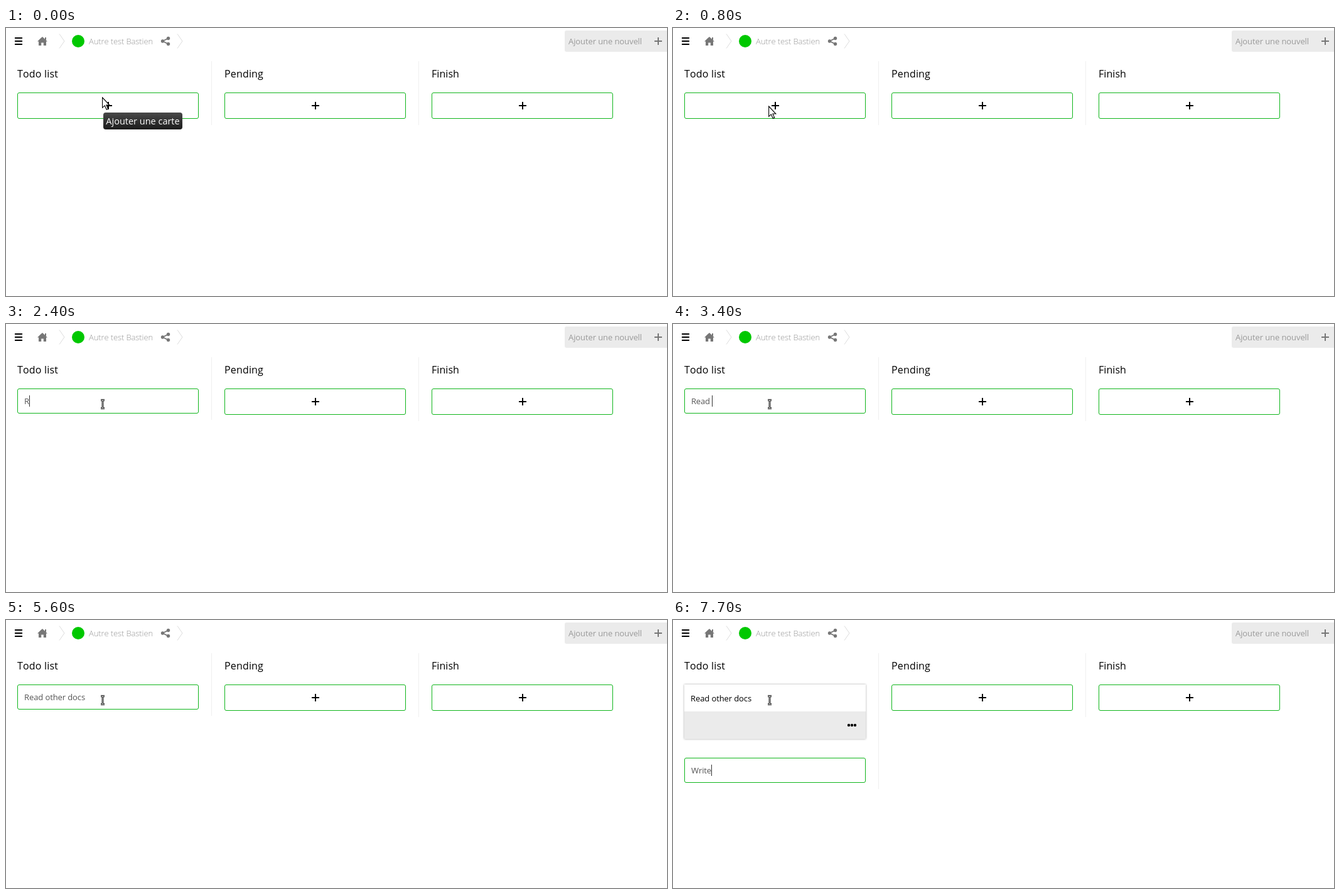
Recreate the animation shown at these times as an HTML page. Size 1053 px wide and 428 px high, loop 8 s.

```html
<!DOCTYPE html>
<html lang="fr">
<head>
<meta charset="utf-8">
<title>Tableau de cartes</title>
<style>
html, body { margin: 0; width: 100%; height: 100%; overflow: hidden; background: #fff; }
#stage { position: relative; width: 1053px; height: 428px; overflow: hidden;
  font: 13px/18px "Open Sans", "Noto Sans", sans-serif; font-kerning: none; color: #000; }
#stage div, svg { position: absolute; white-space: pre; box-sizing: border-box; }
.title { font-size: 16px; line-height: 22px; top: 62px; }
.box { width: 289px; height: 42px; border: 1px solid #0fb51b; border-radius: 3px; background: #fff; }
.plus::before, .plus::after { content: ""; position: absolute; background: #000; }
.plus::before { left: 138px; top: 19px; width: 12px; height: 2px; }
.plus::after { left: 143px; top: 14px; width: 2px; height: 12px; }
.rule { top: 53px; width: 1px; height: 102px; background: #efefef; }
.input { height: 40px; padding: 10px; color: #555; }
.caret { display: inline-block; width: 1px; height: 18px; margin-right: -1px; background: #333; vertical-align: top; }
.hint { left: 10px; top: 10px; color: #a0a0a0; }
#search { left: 890px; top: 4px; width: 163px; height: 34px; border-radius: 3px 0 0 3px; background: #ebebeb; }
#card { left: 18px; top: 103px; width: 289px; height: 87px; background: #fff; box-shadow: 0 0 3px rgba(0,0,0,.35); }
#card .foot { left: 0; top: 43px; width: 289px; height: 44px; background: #ebebeb; }
#tip { left: 155px; top: 135px; width: 126px; height: 27px; border-radius: 4px; text-align: center;
  font-size: 14.5px; line-height: 27px; color: #fff; background: linear-gradient(#484848, #1c1c1c); }
</style>
</head>
<body>
<div id="stage">
  <svg width="1053" height="44" fill="none">
    <path d="M14 16h12M14 21h12M14 26h12" stroke="#000" stroke-width="2"/>
    <path d="M58 14l8 7.5h-2V28h-4.2v-4.5h-3.6V28H52v-6.5h-2L54.5 17z" fill="#777"/>
    <path d="M62 15h2v4h-2z" fill="#777"/>
    <path d="M85 9.5l8 11.5l-8 11.5M273 9.5l8 11.5l-8 11.5" stroke="#dcdcdc"/>
    <circle cx="115" cy="21" r="10" fill="#00c800"/>
    <path d="M258.5 16.5L249.5 21L258.5 25.5" stroke="#777" stroke-width="1.8"/>
    <g fill="#777"><circle cx="258.5" cy="16.5" r="2.7"/><circle cx="249.5" cy="21" r="2.7"/><circle cx="258.5" cy="25.5" r="2.7"/></g>
  </svg>
  <div class="snap" style="left:132px;top:12px;color:#999;font-weight:300">Autre test Bastien</div>
  <div id="search">
    <div class="snap" style="left:6px;top:8px;color:#999">Ajouter une nouvell</div>
    <svg style="left:143px;top:11px" width="12" height="12"><path d="M0 6h12M6 0v12" stroke="#777" stroke-width="2"/></svg>
  </div>

  <div class="title snap" style="left:18px">Todo list</div>
  <div class="title snap" style="left:348px">Pending</div>
  <div class="title snap" style="left:678px">Finish</div>
  <div class="rule" id="rule" style="left:327px"></div>
  <div class="rule" style="left:657px"></div>
  <div class="box plus" id="add" style="left:18px;top:103px"></div>
  <div class="box plus" style="left:348px;top:103px"></div>
  <div class="box plus" style="left:678px;top:103px"></div>

  <div id="card">
    <div class="snap" style="left:10px;top:13px">Read other docs</div>
    <div class="foot"></div>
    <svg style="left:259px;top:60px" width="16" height="10"><circle cx="3" cy="5" r="2.2"/><circle cx="8" cy="5" r="2.2"/><circle cx="13" cy="5" r="2.2"/></svg>
  </div>
  <div class="box input" id="input" style="left:18px"><div class="hint snap" id="hint">Saisissez un titre de carte</div><span id="typed"></span><span class="caret" id="caret"></span></div>

  <div id="tip">Ajouter une carte</div>
  <svg id="arrow" width="14" height="23" style="left:0;top:0">
    <path d="M.6 1v16.3l3.7-3.4l2.9 6.4l2.5-1.1l-2.8-6.2h4.9z" fill="#fff" stroke="#000" stroke-width="1.1"/>
  </svg>
  <svg id="beam" width="9" height="18" style="left:150px;top:119px" fill="none">
    <path d="M1 2.5h6M4 2.5v13M1 15.5h6" stroke="#000" stroke-width="2.8"/>
    <path d="M1 2.5h6M4 2.5v13M1 15.5h6" stroke="#fff" stroke-width=".9"/>
  </svg>
</div>
<script>
const LOOP = 8000, OPEN = 900, NEXT = 6100;
const $ = id => document.getElementById(id);
const pen = document.createElement('canvas').getContext('2d');

// [time, x, y] of the arrow tip
const arrowPath = [[0, 153, 110], [400, 154, 114], [500, 153, 120], [600, 152, 125], [800, 152, 124]];
// [time, letters typed so far]
const typing = [[0, 0], [2400, 1], [2500, 2], [3000, 3], [3200, 4], [3400, 5], [3700, 6], [3900, 7],
  [4100, 8], [4200, 9], [4400, 10], [4500, 11], [4600, 12], [4800, 13], [4900, 14], [5000, 15],
  [NEXT, 0], [7000, 1], [7400, 3], [7600, 4], [7700, 5]];
const caretBlink = [[0, 1], [1400, 0], [1500, 1], [2000, 0], [2400, 1], [5600, 0], [NEXT, 1]];
const hintFade = [[0, .5], [1400, .75], [1500, 1]];

const at = (steps, t) => steps.findLast(s => s[0] <= t);
const show = (el, on) => { el.style.display = on ? '' : 'none'; };

// Rounds the mean letter advance so that text sits on whole pixels.
function snap(el) {
  const text = el.textContent;
  if (!text) return;
  const style = getComputedStyle(el);
  pen.font = `${style.fontWeight} ${style.fontSize} ${style.fontFamily}`;
  let slack = 0;
  for (const c of text) {
    const w = pen.measureText(c).width;
    slack += Math.round(w) - w;
  }
  el.style.letterSpacing = slack / text.length + 'px';
}

function draw(t) {
  const open = t >= OPEN, second = t >= NEXT;
  const text = (second ? 'Write' : 'Read other docs').slice(0, at(typing, t)[1]);
  const [, x, y] = at(arrowPath, t);

  show($('tip'), t < 100);
  show($('add'), !open);
  show($('input'), open);
  show($('card'), second);
  show($('arrow'), !open);
  show($('beam'), open);
  $('arrow').style.transform = `translate(${x}px, ${y}px)`;
  $('beam').style.top = (t < 1200 ? 118 : 119) + 'px';
  $('input').style.top = (second ? 220 : 103) + 'px';
  $('rule').style.height = (second ? 217 : open ? 100 : 102) + 'px';

  show($('hint'), !text);
  $('hint').style.opacity = at(hintFade, t)[1];
  $('caret').style.visibility = at(caretBlink, t)[1] ? 'visible' : 'hidden';
  if ($('typed').textContent !== text) {
    $('typed').textContent = text;
    snap($('typed'));
  }
}

document.querySelectorAll('.snap').forEach(snap);
const start = performance.now();
function tick() {
  draw((performance.now() - start) % LOOP);
  requestAnimationFrame(tick);
}
tick();
</script>
</body>
</html>
```
